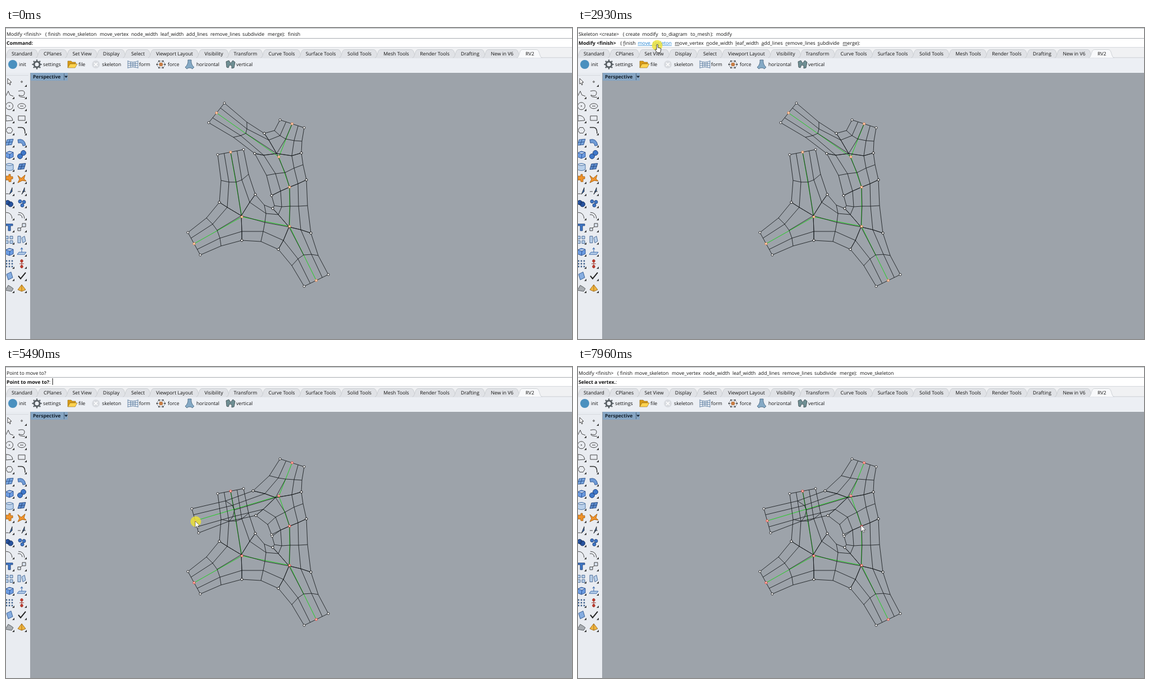
Recreate the animation shown at these times as an HTML page with a canvas. Size 1008 by 555 pixels, loop 8000 ms.

```html
<!DOCTYPE html>
<html lang="en">
<head>
<meta charset="utf-8">
<title>Skeleton modelling</title>
<style>
html, body { margin: 0; width: 100%; height: 100%; overflow: hidden; }
canvas { display: block; }
</style>
</head>
<body>
<canvas id="stage" width="1008" height="555"></canvas>
<script>
const LOOP = 8000;
const c = document.getElementById('stage').getContext('2d');
const FACE = '"Open Sans", "Noto Sans", sans-serif';

// ---------- helpers ----------
function text(s, x, y, { bold = false, color = '#111', align = 'left', size = 8.7 } = {}) {
  c.font = `${bold ? 'bold ' : ''}${size}px ${FACE}`;
  c.textAlign = align;
  c.fillStyle = color;
  c.fillText(s, x, y);
  return c.measureText(s).width;
}
function rect(x, y, w, h, color) {
  c.fillStyle = color;
  c.fillRect(x, y, w, h);
}
function disc(x, y, r, fill, stroke, width = 0.9) {
  c.beginPath();
  c.arc(x, y, r, 0, 7);
  paint(undefined, fill, stroke, width);
}
function paint(path, fill, stroke, width = 0.9) {
  const args = path ? [path] : [];
  if (fill) { c.fillStyle = fill; c.fill(...args); }
  if (stroke) { c.strokeStyle = stroke; c.lineWidth = width; c.stroke(...args); }
}
function shape(d, x, y, fill, stroke, width) {
  c.save();
  c.translate(x, y);
  paint(new Path2D(d), fill, stroke, width);
  c.restore();
}
const mix = (a, b, k) => a.map((v, i) => v + (b[i] - v) * k);
const points = s => s.split(' ').map(p => p.split(',').map(Number));

// ---------- mesh: strips of five rails and three rows ----------
function strip(...rows) {
  return rows.map(row => {
    const p = points(row);
    return p.length === 2 ? [0, 1, 2, 3, 4].map(i => mix(p[0], p[1], i / 4)) : p;
  });
}
const MID = '473,299 489,291 505,284 520,278 535,271';
const HUBS = { top: [486, 230], mid: [505, 284], right: [505, 354], left: [420, 337] };
const shared = [
  { hub: 'left', dark: true, rows: strip('377,226 423,217', '383,272 397,275 410,275 420,271 432,261',
    '380,311 394,320 419,335 434,311 444,297') },
  { hub: 'left', rows: strip('324,365 346,405', '357,339 368,350 376,361 381,375 383,389',
    '380,311 394,320 419,335 420,363 420,379') },
  { hub: 'right', rows: strip('574,440 531,461', '556,406 544,404 530,405 520,412 509,424',
    '543,366 525,360 504,355 494,379 485,395') },
  { rows: strip('444,297 434,311 419,335 420,363 420,379', '460,316 463,331 461,347 458,363 454,381',
    '475,322 485,333 504,355 494,379 485,395') },
  { rows: strip(MID, '478,317 491,319 506,318 521,318 537,317', '475,322 485,333 504,355 525,360 543,366') },
];
const before = [...shared,
  { hub: 'top', rows: strip('389,134 361,169', '429,168 429,180 427,188 418,192 405,195',
    '460,188 468,200 482,224 459,227 443,224') },
  { hub: 'top', dark: true, rows: strip('488,164 531,178', '478,183 488,192 498,198 513,201 527,202',
    '460,188 468,200 482,224 509,228 526,223') },
  { rows: strip('443,224 459,227 482,224 509,228 526,223', '464,263 480,260 497,258 513,250 529,244', MID) },
];
const after = [...shared,
  { hub: 'top', rows: strip('331,253 343,296', '391,239 403,247 407,255 404,267 398,275',
    '440,221 461,226 480,233 458,254 445,265') },
  { hub: 'top', rows: strip('488,164 531,178', '469,194 485,198 498,200 513,201 527,202',
    '440,221 461,226 480,233 509,228 526,223') },
  { rows: strip('445,265 458,254 480,233 509,228 526,223', '466,281 480,268 497,259 513,250 529,244',
    MID.replace('473,299', '474,302')) },
];

function mesh(strips, nodeColor) {
  const lines = new Path2D(), core = new Path2D(), green = new Path2D();
  const trace = (path, list) => list.forEach((p, i) => path[i ? 'lineTo' : 'moveTo'](...p));
  const { top, mid, right, left } = HUBS;
  const nodes = [top, mid, right, left];
  trace(green, nodes);
  for (const { rows, hub, dark } of strips) {
    rows.forEach(row => trace(lines, row));
    for (let i = 0; i < 5; i++) {
      const rail = rows.map(row => row[i]);
      if (i === 2) trace(core, hub && !dark ? rail.slice(1) : rail);
      else trace(lines, rail);
    }
    if (hub) {
      trace(green, [rows[0][2], HUBS[hub]]);
      nodes.push(rows[0][2]);
    }
  }
  paint(green, null, '#22cf22', 1);
  c.globalAlpha = 0.75;
  paint(core, null, '#000', 0.9);
  c.globalAlpha = 1;
  paint(lines, null, '#15181b', 0.85);
  for (const { rows } of strips)
    for (const row of [rows[0], rows[2]])
      for (const p of [row[0], row[4]]) disc(...p, 2, '#fff', '#111', 0.8);
  nodes.forEach(p => disc(...p, 1.8, '#fbe9df', nodeColor, 1.1));
}

// ---------- command lines ----------
const MENUS = {
  skeleton: { title: 'Skeleton <create>', end: 236,
    options: { create: 85, modify: 114.5, to_diagram: 149, to_mesh: 200.5 } },
  modify: { title: 'Modify <finish>', end: 492,
    options: { finish: 75, move_skeleton: 101, move_vertex: 167, node_width: 223, leaf_width: 275,
      add_lines: 321, remove_lines: 364, subdivide: 421, merge: 466 } },
};
const STATES = [
  { t: 0, log: ['modify', 'finish'], prompt: 'Command:' },
  { t: 1400, log: 'Command: -_RV2skeleton', menu: 'skeleton', caret: 249 },
  { t: 2330, log: ['skeleton', 'modify'], menu: 'modify', caret: 508 },
  { t: 3160, log: ['modify', 'move_skeleton'], prompt: 'Select a vertex.', caret: 72 },
  { t: 4650, log: 'Select a vertex.', prompt: 'Point to move to?', caret: 83 },
  { t: 5400, log: 'Point to move to?', prompt: 'Point to move to?', caret: 83 },
  { t: 5950, log: 'Point to move to?', menu: 'modify', caret: 508 },
  { t: 7200, log: ['modify', 'move_skeleton'], prompt: 'Select a vertex.', caret: 72 },
];

// Draws a menu line and tells whether the pointer is over one of its options.
function menuLine(name, y, { live = false, answer = '', pointer } = {}) {
  const { title, options, end } = MENUS[name];
  const dx = live ? 5.5 : 0;
  let hit = false;
  text(title, 1, y, { bold: live });
  text('(', Object.values(options)[0] - 5 + dx, y);
  for (const [word, x0] of Object.entries(options)) {
    const x = x0 + dx;
    c.font = `8.7px ${FACE}`;
    const w = c.measureText(word).width;
    const over = live && pointer && pointer[0] > x && pointer[0] < x + w && pointer[1] > 18 && pointer[1] < 34;
    const color = over ? '#1a7fd0' : '#111';
    text(word, x, y, { color });
    if (live) rect(x, y + 1.4, over ? w : c.measureText(word[0]).width, 0.7, color);
    hit = hit || over;
  }
  text('):', end + dx, y);
  text(answer, end + 10, y);
  return hit;
}

function commands(t, pointer) {
  const s = STATES.filter(state => state.t <= t).pop();
  let hit = false;
  rect(0, 0, 1008, 35, '#fff');
  rect(0, 0, 1008, 1, '#b4b8bd');
  rect(0, 18, 1008, 1, '#a7abb0');
  rect(0, 34, 1008, 1, '#d5d8dc');
  if (Array.isArray(s.log)) menuLine(s.log[0], 13.5, { answer: s.log[1] });
  else text(s.log, 1, 13.5);
  if (s.menu) hit = menuLine(s.menu, 29.5, { live: true, pointer });
  else {
    const w = text(s.prompt, 1, 29.5, { bold: true });
    if (s.caret) text(':', 1 + w, 29.5);
  }
  if (s.caret && (t - s.t) % 1060 < 530) rect(s.caret - 0.5, 20, 1, 12, '#111');
  return hit;
}

// ---------- tabs and toolbar ----------
const TABS = { Standard: 28.5, CPlanes: 83, 'Set View': 135.5, Display: 187.5, Select: 235,
  'Viewport Layout': 300, Visibility: 370, Transform: 426.5, 'Curve Tools': 491, 'Surface Tools': 560.5,
  'Solid Tools': 629.5, 'Mesh Tools': 695, 'Render Tools': 763.5, Drafting: 826.5, 'New in V6': 883.5, RV2: 933 };
const LABELS = { init: 23, settings: 66, file: 129, skeleton: 171, form: 237, force: 288, horizontal: 339, vertical: 410 };

function toolbar(hover) {
  rect(0, 35, 1008, 18, '#f0f1f3');
  rect(0, 53, 1008, 27, '#eceff4');
  rect(0, 52.5, 1008, 0.8, '#c3c7cc');
  let left = 1;
  for (const [name, x] of Object.entries(TABS)) {
    c.font = `8.7px ${FACE}`;
    const half = c.measureText(name).width / 2 + 10, active = name === 'RV2';
    const right = x + half;
    shape(`M${left - 4},53 C${left + 1},53 ${left},38.5 ${left + 6},38.5 H${right - 6}
      C${right},38.5 ${right - 1},53 ${right + 4},53`, 0, 0, active ? '#f8f9fb' : '#e0e2e6', '#bfc3c8', 0.7);
    text(name, x, 48.7, { align: 'center' });
    left = right;
  }
  if (hover) rect(149, 56, 60, 18, '#d3e6f7');
  for (const [name, x] of Object.entries(LABELS)) text(name, x, 67.8);

  disc(12, 65, 8, '#4a90bf');
  disc(55, 65, 5, null, '#555c61', 3);
  for (let i = 0; i < 8; i++) {
    const a = i * Math.PI / 4;
    disc(55 + 7.4 * Math.cos(a), 65 + 7.4 * Math.sin(a), 1.3, '#555c61');
  }
  shape('M-8,6 V-6 H-2 L0,-4 H6 V-1 H-4 Z', 118, 65, '#d99a16', '#8b6715', 0.6);
  shape('M-8,6 L-4,-1 H9 L5,6 Z', 118, 65, '#ffd34f', '#8b6715', 0.6);
  disc(160, 65, 7, '#d9dce1');
  shape('M-3,-3 L3,3 M3,-3 L-3,3', 160, 65, null, '#fff', 1.6);
  shape('M-9,-6 Q0,-2 9,-6 M-9,-2 Q0,0 9,-2 M-9,2 Q0,1 9,2 M-9,6 Q0,3 9,6 M-9,-7 V7 M-4,-5 V5 M0,-4 V4 M4,-5 V5 M9,-7 V7',
    226, 65, null, '#4b6f98', 0.8);
  shape('M-8,0 L-4,-6 H4 L8,0 L4,6 H-4 Z M-8,0 H8 M-4,-6 L4,6 M4,-6 L-4,6', 276, 65, null, '#777', 0.7);
  for (let i = 0; i < 6; i++) {
    const a = i * Math.PI / 3;
    disc(276 + 7 * Math.cos(a), 65 + 7 * Math.sin(a), 1.3, '#3d4246');
  }
  disc(276, 65, 3.3, '#c77c42');
  shape('M-3,-8 H3 Q2,0 8,5 L5,8 Q0,4 -5,8 L-8,5 Q-2,0 -3,-8 Z', 327, 65, '#84a9c5', '#45617a', 0.8);
  shape('M-8,-5 L-3,-7 L0,-2 L4,-7 L8,-4 L6,6 L2,7 V2 L-2,1 L-4,6 L-7,5 Z', 400, 65, '#6f8f94', '#38484c', 0.8);
}

// ---------- side panel ----------
const BLUE = '#3f78c9', INK = '#333', PALE = '#b9d0ea', ORANGE = '#f0932b';
const RING = (x, y, r) => `M${x - r},${y} a${r},${r} 0 1,0 ${2 * r},0 a${r},${r} 0 1,0 ${-2 * r},0`;
const BOX = (x, y, s) => `M${x},${y} h${s} v${s} h${-s} Z`;
const CUBE = 'M-7,-3 L0,-6 L7,-4 V4 L0,7 L-7,4 Z M-7,-3 L1,-1 L7,-4 M1,-1 L0,7';
const PATCH = 'M-7,5 L-4,-5 L7,-6 L4,4 Z M-5.5,0 L5.5,-1 M-2,5 L1,-5';
const ARC = 'M-6,-5 Q4,-5 5,6';
const TOOLS = [
  ['M-3,-6 V4 L-1,2 L1,6 L2,5 L1,1 H4 Z', '#fff', INK], [RING(0, 0, 1.3), '#fff', INK],
  ['M-7,5 L-2,-5 L1,2 L7,4', null, INK], ['M-6,-5 Q6,-8 5,-1 T-5,2 Q-6,6 6,6', null, INK],
  [RING(0, 0, 6.5) + RING(0, 0, 0.7), null, INK], ['M-7,0 a7,4.5 0 1,0 14,0 a7,4.5 0 1,0 -14,0 M-3,0 H3', null, INK],
  ['M-6,-5 Q5,-5 6,4 L-6,5 Z', null, INK], ['M-6,-4 H6 V4 H-6 Z', null, INK],
  ['M-6,0 L-3,-5 H3 L6,0 L3,5 H-3 Z', null, INK], ['M-7,-5 H0 Q6,-5 6,6', null, INK, 1.5],
  [PATCH, '#78a5dd', '#274f8c'], ['M-7,-5 Q5,-8 7,5 L2,6 Q1,-1 -6,1 Z', '#6f9bd6', '#274f8c'],
  [CUBE, '#6c9ce2', '#234a8b'], [RING(-3, 3, 4.5) + RING(3, -3, 4.5), BLUE, '#1d3d73'],
  ['M-7,-4 Q0,-8 7,-4 V5 Q0,9 -7,5 Z M-7,-4 Q0,0 7,-4', PALE, '#426a9c'], [PATCH, '#5c8acb', '#24477d'],
  ['M-6,-5 H-1 V-8 H2 V-4 H6 V0 H3 V5 H-1 V2 H-6 Z', ORANGE, '#a45d0c'], ['M-7,-6 L-1,-1 L6,-7 L4,0 L8,4 L1,3 L-7,7 L-4,1 Z', ORANGE, '#a45d0c'],
  ['M-6,5 H-1 M0,6 L5,-6 V1 Z', '#2b61ad', INK], ['M-7,1 H-2 M1,1 H7 M0,6 L5,-6 V0 Z', '#2b61ad', INK],
  [RING(-3, -1, 4) + RING(2, 2, 4.5), '#2753a0', '#142b55'], [RING(-3, -3, 3) + RING(4, -2, 3) + RING(1, 4, 3), BLUE, '#1d3d73'],
  [ARC, null, INK], [ARC + 'M-7,-1 Q0,-2 1,5', null, INK],
  ['M-6,-6 H6 V-3 H2 V6 H-2 V-3 H-6 Z', BLUE, '#1d3d73'], [BOX(-7, 1, 5) + BOX(1, -7, 6) + 'M-2,1 L1,-1', '#dbe4ef', INK],
  [BOX(-7, -6, 5) + BOX(1, -6, 5) + BOX(-7, 2, 5) + BOX(1, 2, 5), PALE, '#41638f'], ['M-7,-6 H-2 V6 H-7 Z M0,-3 L5,-6 L7,3 L2,6 Z', PALE, '#41638f'],
  [CUBE, '#6c9ce2', '#234a8b'], ['M-8,5 L-5,1 H8 L5,5 Z M0,1 V-7 M-2,-4 L0,-7 L2,-4', PALE, '#2c5da4'],
  [[-6, -1, 4].map(y => [-6, -1, 4].map(x => BOX(x, y, 2)).join('')).join(''), '#456b99', '#294b76', 0.5], [RING(0, -5, 2.3) + RING(0, 5, 2.3) + 'M0,-8 V8 M-4,0 H4', '#d94b3c', '#9a271b'],
  ['M-5,-3 L3,-7 L6,3 L-2,7 Z', '#86ade0', '#2e568f'], ['M-6,0 L-2,5 L7,-6', null, '#222', 2],
  ['M-7,4 L-2,-5 L3,-2 L7,1 L4,6 Z', '#a9adb2', '#54585c'], ['M-7,3 L0,-6 L7,3 L0,6 Z M0,-6 V6', '#f1b640', '#9a681c'],
];
function sidebar() {
  rect(0, 80, 43, 475, '#e9ecf1');
  rect(0, 84, 40, 0.7, '#cfd3d9');
  TOOLS.forEach(([d, fill, stroke, width], i) => {
    const x = i % 2 ? 28 : 6, y = 96 + (i >> 1) * 21.65;
    shape(d, x, y, fill, stroke, width);
    if (i) shape('M9,5 V9 H5 Z', x, y, '#333');
  });
}

function viewport() {
  rect(43, 80, 965, 475, '#9da3aa');
  rect(44, 80, 66, 14, '#86a5c3');
  text('Perspective', 48, 90.2, { bold: true, color: '#14202c', size: 8.5 });
  rect(103, 81, 0.8, 12, '#40566c');
  shape('M-3,-1.5 H3 L0,2 Z', 107, 87, '#14202c');
}

// ---------- pointer ----------
const PATH = [
  [810, 205, 14], [1040, 176, 61], [1300, 176, 61], [1930, 151, 29], [2010, 135, 29], [2200, 135, 29],
  [2470, 140, 30], [3080, 140, 30], [3650, 282, 129], [3690, 282, 129], [4020, 332, 183], [4480, 373, 152],
  [4730, 373, 154], [5290, 337, 275], [6140, 337, 274], [6940, 156, 26], [7150, 156, 26],
  [7450, 420, 313], [7760, 509, 289], [7810, 509, 289], [7960, 504, 282],
];
const CLICKS = [1220, 2060, 2850, 4530, 5340, 6990];

function pointerAt(t) {
  if (t < PATH[0][0]) return null;
  const i = PATH.findIndex(k => k[0] > t);
  if (i < 0) return PATH.at(-1).slice(1);
  const a = PATH[i - 1], b = PATH[i];
  const k = (t - a[0]) / (b[0] - a[0]);
  return mix(a.slice(1), b.slice(1), k * k * (3 - 2 * k));
}
function drawPointer(t, [x, y], hand) {
  if (CLICKS.some(k => t >= k && t < k + 160)) disc(x + 1, y + 1, 9.5, 'rgba(240,228,50,.8)');
  if (t >= 4650 && t < 5400) {
    c.setLineDash([2, 2]);
    shape(`M${x},${y} L${HUBS.top}`, 0, 0, null, '#123a16', 1);
    c.setLineDash([]);
    const cross = 'M-9,0 H-2 M2,0 H9 M0,-9 V-2 M0,2 V9';
    shape(cross, x, y, null, 'rgba(255,255,255,.75)', 2.6);
    shape(cross + BOX(-2, -2, 4), x, y, null, '#111', 1);
  } else if (hand) {
    shape('M0,0 Q1.3,-1.4 2.4,0 V5 L7,6 Q8,6.5 7.7,9 L6.5,14 H1 L-2.8,8.7 Q-2.5,7 0,8.7 Z', x, y, '#fff', '#111', 0.8);
  } else {
    shape('M0,0 V11.8 L2.7,9.3 L4.5,13.5 L6.3,12.7 L4.6,8.7 H8.3 Z', x, y, '#fff', '#222', 0.6);
  }
}

function frame(now) {
  const t = now % LOOP, pointer = pointerAt(t);
  c.textRendering = 'geometricPrecision';
  viewport();
  sidebar();
  toolbar(pointer && pointer[1] > 56 && pointer[1] < 74 && pointer[0] > 149 && pointer[0] < 209);
  const hand = commands(t, pointer);
  const moved = t >= 5400;
  mesh(moved ? after : before, moved ? '#f0473c' : '#f08a4b');
  if (pointer) drawPointer(t, pointer, hand);
}

const start = performance.now();
(function loop() {
  frame(performance.now() - start);
  requestAnimationFrame(loop);
})();
</script>
</body>
</html>
```
